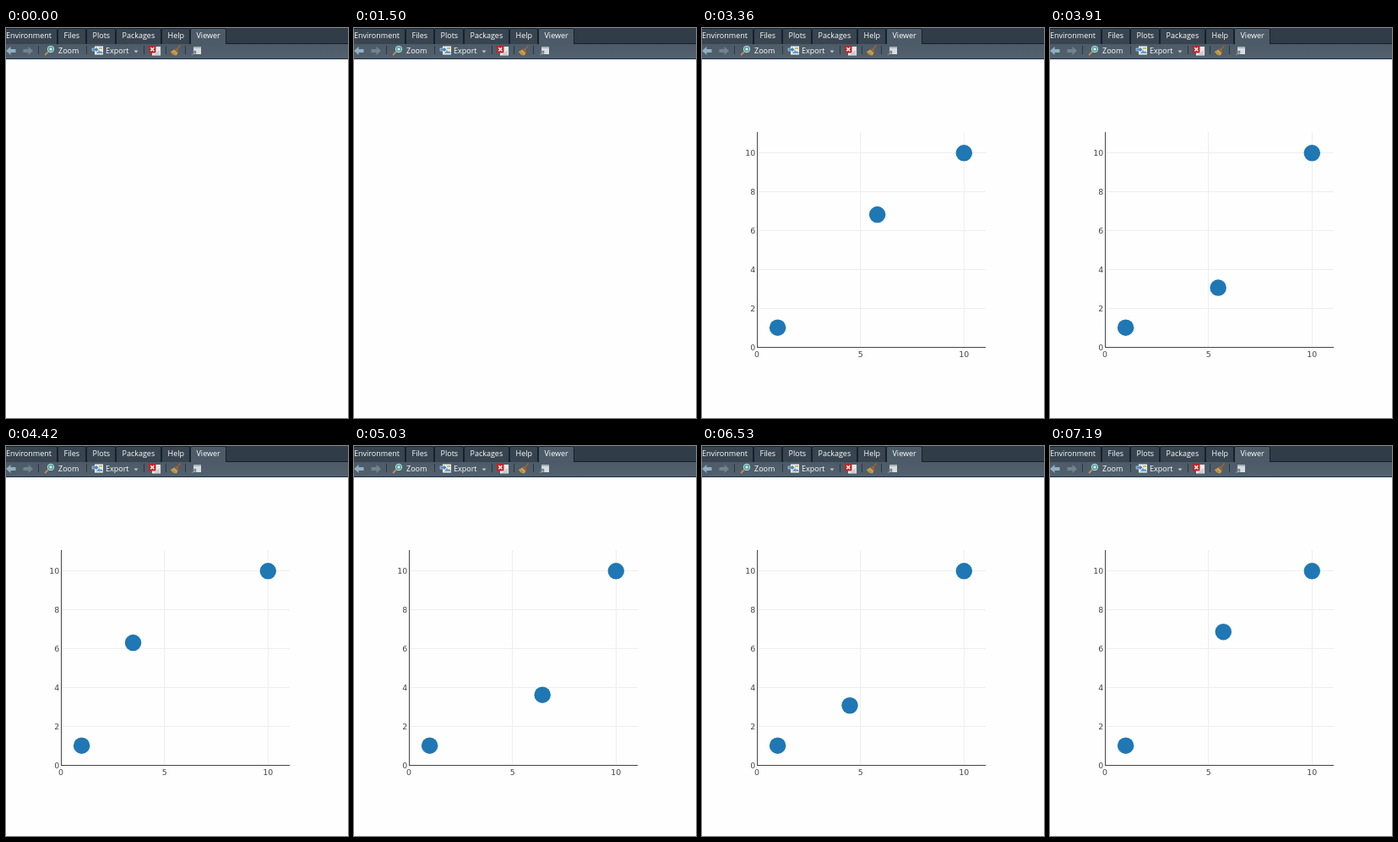
Write an HTML page that moves like this. It is 405 px wide and 461 px high and loops after 7.29 s.

```html
<!DOCTYPE html>
<html lang="en">
<head>
<meta charset="utf-8">
<title>Viewer pane</title>
<style>
html, body { margin: 0; width: 100%; height: 100%; overflow: hidden; background: #fefefe; }
svg { display: block; width: 100vw; height: 100vh; }
.ui { font: 9px "Open Sans", "Noto Sans", sans-serif; fill: #fff; }
.axis { font: 9.4px "DejaVu Sans", sans-serif; fill: #444; }
</style>
</head>
<body>
<svg viewBox="0 0 405 461">
  <defs>
    <linearGradient id="bar" x1="0" y1="0" x2="0" y2="1">
      <stop offset="0" stop-color="#4c5b67"/>
      <stop offset="1" stop-color="#52616d"/>
    </linearGradient>
    <path id="arrow" d="M0 27l5.5-5v3h6v4h-6v3z"/>
  </defs>
  <rect width="405" height="461" fill="#fefefe"/>

  <rect width="405" height="19" fill="#303c47"/>
  <rect y="18" width="405" height="1" fill="#13202c"/>
  <rect y="19" width="405" height="17" fill="url(#bar)"/>
  <rect y="36" width="405" height="1" fill="#1b3045"/>
  <g id="tabs" class="ui"></g>

  <g id="seps" stroke="#2b3741"></g>
  <use href="#arrow" fill="#90afc3"/>
  <use href="#arrow" fill="#71838f" transform="matrix(-1 0 0 1 32 0)"/>

  <path d="M46 32l4-4" stroke="#b98b57" stroke-width="2"/>
  <circle cx="53" cy="25" r="3.7" fill="#3f9d91" stroke="#c7dfe9"/>
  <path d="M51 25h4M53 23v4" stroke="#fff"/>
  <text class="ui" x="62" y="30">Zoom</text>

  <rect x="105" y="21.5" width="10" height="10" fill="#e6edf2"/>
  <path d="M107 30l3-4 2 2 1-1 2 3z" fill="#6d9ab9"/>
  <rect x="110" y="23" width="4" height="2" fill="#d6b65a"/>
  <path d="M102 24h4v-2l4 3.500-4 3.500v-2h-4z" fill="#4a86bb" stroke="#fff" stroke-width=".5"/>
  <text class="ui" x="118" y="30">Export</text>
  <path d="M151.500 26.500h5l-2.500 3z" fill="#bcc5cb"/>

  <g id="actions">
    <path d="M173 22h10v10.500h-10z" fill="#e9eaeb"/>
    <path d="M178 29l4-3v6h-7z" fill="#c9ced2"/>
    <rect x="169" y="21" width="8.500" height="8.500" rx="1" fill="#bd2727"/>
    <path d="M171.300 23.300l4 4m0-4l-4 4" stroke="#fff" stroke-width="1.400"/>
    <path d="M202 26l4.500-5.500" stroke="#9c6236" stroke-width="1.800"/>
    <path d="M195 28l6-3.500 3 3-2 5c-3 0-5-1-7-4.500z" fill="#c9a04a"/>
    <path d="M200 25l3.500 3.500" stroke="#8d4a32" stroke-width="1.500"/>
    <path d="M197 28.500l4 3" stroke="#8f7334" stroke-width=".7"/>
    <rect x="222" y="22" width="9" height="9" fill="#d8dde0"/>
    <rect x="222" y="22" width="9" height="2" fill="#a7b3bb"/>
    <path d="M220 32l4-4m-3-.500h3.500v3.500" fill="none" stroke="#78858e" stroke-width="1.400"/>
  </g>

  <g id="plot">
    <g id="grid" stroke="#eee"></g>
    <path d="M65.500 123v254.500M65 377.500h271" stroke="#444" fill="none"/>
    <g id="labels" class="axis"></g>
    <g id="dots" fill="#1f77b4"></g>
  </g>
</svg>
<script>
const LOOP = 7290, SHOW = 2040;
const $ = id => document.getElementById(id);
const px = v => 65.1 + 24.52 * v;
const py = v => 377.1 - 22.93 * v;

function add(parent, tag, attrs, text) {
  const el = document.createElementNS("http://www.w3.org/2000/svg", tag);
  for (const k in attrs) el.setAttribute(k, attrs[k]);
  if (text !== undefined) el.textContent = text;
  return $(parent).appendChild(el);
}

// label, left, right, text start
const tabs = [
  ["Environment", -6, 60, 0], ["Files", 62, 94, 68.5], ["Plots", 96, 129, 102.5],
  ["Packages", 131, 183, 137.5], ["Help", 185, 217, 191.5], ["Viewer", 219, 260, 225.5]
];
for (const [name, left, right, x] of tabs) {
  const active = name === "Viewer";
  add("tabs", "path", {
    d: `M${left - .5} 19V2.5q0-2 2-2H${right - 1.5}q2 0 2 2V19`,
    fill: active ? "#4c5b67" : "#38444f", stroke: "#13222f"
  });
  add("tabs", "text", { x, y: 12 }, name);
}
for (const x of [38.5, 95.5, 163.5, 189.5, 212.5])
  add("seps", "path", { d: `M${x} 21v10` });

for (const v of [5, 10])
  add("grid", "path", { d: `M${Math.floor(px(v)) + .5} 123V377` });
for (const v of [2, 4, 6, 8, 10])
  add("grid", "path", { d: `M65 ${Math.floor(py(v)) + .5}H336` });
for (const v of [0, 5, 10])
  add("labels", "text", { x: px(v), y: 389, "text-anchor": "middle" }, v);
for (const v of [0, 2, 4, 6, 8, 10])
  add("labels", "text", { x: 63.3, y: py(v) + 3.4, "text-anchor": "end" }, v);

const dot = (x, y) => add("dots", "circle", { cx: px(x), cy: py(y), r: 9.75 });
dot(1, 1);
dot(10, 10);
const mover = dot(5, 7);

// time in ms, angle in degrees, steps to the next key
const keys = [
  [2040, 90, 8], [2520, -53, 4], [2750, -122, 11], [3360, -294, 3],
  [3530, -334, 1], [3560, -342, 12], [4240, -531, 1], [4300, -547, 2],
  [4420, -580.7, 10], [4970, -747, 1], [5030, -763.7, 13], [5730, -960, 3],
  [5870, -998.7, 12], [6470, -1168, 1], [6530, -1185, 11], [7190, -1371, 0]
];

function angleAt(t) {
  let i = keys.length - 1;
  while (i > 0 && t < keys[i][0]) i--;
  const [t0, a0, n] = keys[i];
  if (!n) return a0;
  const [t1, a1] = keys[i + 1];
  const step = Math.max(0, Math.floor((t - t0) / (t1 - t0) * n + 1e-6));
  return a0 + (a1 - a0) * step / n;
}

function draw(t) {
  const off = t >= 270 && t < 1500;
  $("actions").setAttribute("opacity", off ? .4 : 1);
  $("plot").setAttribute("visibility", t < SHOW ? "hidden" : "visible");
  const a = angleAt(t) * Math.PI / 180;
  mover.setAttribute("cx", px(5 + 2 * Math.cos(a)));
  mover.setAttribute("cy", py(5 + 2 * Math.sin(a)));
}

const start = performance.now();
function tick() {
  draw((performance.now() - start) % LOOP);
  requestAnimationFrame(tick);
}
tick();
</script>
</body>
</html>
```
